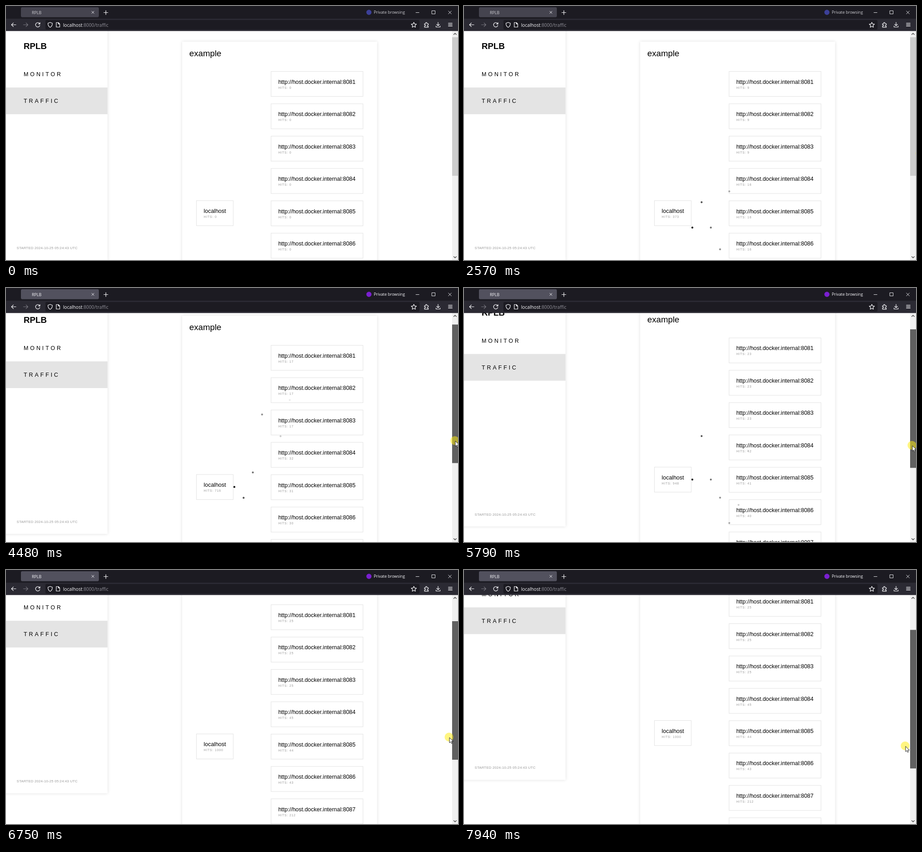
An HTML page for the animation above (8000 ms loop, 998 by 561 pixels).

```html
<!DOCTYPE html>
<html lang="en">
<head>
<meta charset="utf-8">
<title>Traffic monitor</title>
<style>
html, body { margin: 0; width: 100%; height: 100%; overflow: hidden; background: #fff; }
svg { display: block; width: 998px; height: 561px; }
#page { font: 12.47px "Liberation Sans", Arial, sans-serif; }
#page .big { font-size: 18.7px; }
#page .menu { letter-spacing: 3.9px; }
#page .hits { font-size: 7px; letter-spacing: .78px; fill: #999; }
#page .started { font-size: 7.8px; letter-spacing: .2px; fill: #999; }
.panel { fill: #fff; filter: drop-shadow(0 0 3px rgba(0,0,0,.13)); }
.node { fill: #fff; stroke: #e2e2e2; stroke-width: 1; }
#chrome { font: 8.9px "Open Sans", "Noto Sans", sans-serif; }
.icon { fill: none; stroke: #fbfbfe; stroke-width: 1.2; stroke-linecap: round; stroke-linejoin: round; }
.thin { stroke-width: .9; }
</style>
</head>
<body>
<svg viewBox="0 0 998 561">
  <g id="page">
    <rect class="panel" x="-10" y="45" width="234.3" height="516"/>
    <rect y="180" width="224" height="59" fill="#e4e4e4"/>
    <text class="big" x="39" y="95.2" font-weight="bold">RPLB</text>
    <text class="menu" x="39" y="155">MONITOR</text>
    <text class="menu" x="39" y="214.2">TRAFFIC</text>
    <text class="started" x="23.5" y="536.9">STARTED 2024-10-25 05:24:43 UTC</text>
    <rect class="panel" x="389" y="78.8" width="430.5" height="740"/>
    <text class="big" x="404.8" y="110.6">example</text>
    <g id="nodes"></g>
    <g id="dots"></g>
  </g>

  <rect x="985" y="55" width="13" height="506" fill="#f0f0f0"/>
  <rect id="thumb" x="985" width="13" height="306"/>
  <path class="icon" style="stroke:#505050;stroke-width:1.6"
    d="M988.7 63l2.8-2.8 2.8 2.8M988.7 553.5l2.8 2.8 2.8-2.8"/>

  <g id="chrome">
    <rect width="998" height="28" fill="#1c1b22"/>
    <rect y="28" width="998" height="27.3" fill="#2b2a33"/>
    <rect id="tab" x="33" y="2.8" width="172" height="22" rx="3"/>
    <rect x="87" y="31" width="826" height="21" rx="3" fill="#1c1b22"/>
    <g id="title">
      <text x="57" y="17.5">RPLB</text>
      <text x="812" y="17.3">Private browsing</text>
    </g>
    <circle id="badge" cx="801.3" cy="14" r="5.7"/>
    <text x="126" y="45.6" font-size="10.2" fill="#fbfbfe">localhost<tspan fill="#92919a">:8000/traffic</tspan></text>
    <g class="icon">
      <path d="M22 41.5H12.5M16.3 37.3l-4.2 4.2 4.2 4.2"/>
      <path stroke="#77767e" d="M38.5 41.5H48M44.2 37.3l4.2 4.2-4.2 4.2"/>
      <path d="M74.4 39.4a4.8 4.8 0 1 0 .3 3.6M75 36.6v3.2h-3.2"/>
      <path d="M97.5 36.2l4.8 1.8c.2 4.5-1 7.2-4.8 9.2-3.8-2-5-4.7-4.8-9.2z"/>
      <path d="M111 36.5h4.6l3 3v7H111zM115.4 36.7v3h3"/>
      <path d="M900.5 36l1.7 3.7 4 .5-3 2.7.8 4-3.5-2-3.5 2 .8-4-3-2.7 4-.5z"/>
      <path d="M924 39h2.5v-1.2a1.5 1.5 0 0 1 3 0V39h3v3h-1a1.4 1.4 0 0 0 0 2.8h1v2H924v-2.6h1a1.4 1.4 0 0 0 0-2.8h-1z"/>
      <path d="M954 36v7.3M950.8 40.3l3.2 3.2 3.2-3.2M949.5 44v2.5h9V44"/>
      <path d="M976.8 38.2h8.4M976.8 41.3h8.4M976.8 44.4h8.4"/>
      <path class="thin" d="M189.3 11.5l5 5m0-5l-5 5"/>
      <path d="M220.5 10v9M216 14.5h9"/>
      <path class="thin" d="M905 14.5h7M940.5 10.5h7v7h-7zM976.8 11l6.6 6.6m0-6.6l-6.6 6.6"/>
    </g>
  </g>

  <g id="cursor">
    <circle r="9.7" fill="#ffec10" fill-opacity=".52"/>
    <path d="M1 1v11.8l2.7-2.5 1.8 4 2-.9-1.8-3.9h3.7z" fill="#fff" stroke="#111" stroke-width=".9"/>
  </g>
</svg>
<script>
const $ = id => document.getElementById(id);
const set = (id, name, value) => $(id).setAttribute(name, value);

const LOOP = 8000, BEGIN = 500, STEP = 68.2;      // ms
const HOVER = 2650, CLICK = 3100;                 // scrollbar thumb events, ms
const PIXEL = 998 / 1280;                         // size of one screen pixel
const SERVERS = 8, PITCH = 71.45, CENTER = 457.4;
const REQUESTS = 1000, RATE = .1795;              // requests in all, and per ms
const LAST_DOT = Math.floor(REQUESTS / RATE / STEP);

// Pointer: time, x, page scroll.
const drag = [
  [2400, 1014, 0], [2900, 995, 0], [3300, 994, 0], [3460, 992.5, 4],
  [4480, 991, 18], [5790, 989, 34.3], [6750, 978, 67.8], [7940, 974, 97.4]
];

function pointer(t) {
  const next = drag.findIndex(p => p[0] > t);
  if (next < 0) return drag[drag.length - 1];
  if (next === 0) return drag[0];
  const a = drag[next - 1], b = drag[next], u = (t - a[0]) / (b[0] - a[0]);
  return a.map((v, i) => v + (b[i] - v) * u);
}

// Share of the requests that server n receives.
const share = n => n === 0 ? 1 : n < 4 ? .025 : n < 7 ? .049 - n / 1000 : .212;

function random(seed) {
  return Math.abs(Math.sin(seed * 12.9898) * 43758.5) % 1;
}

function node(x, y, width, label) {
  return `<rect class="node" x="${x}" y="${y}" width="${width}" height="55.3"/>
    <text x="${x + 16}" y="${y + 27.2}">${label}</text>
    <text class="hits" x="${x + 16}" y="${y + 38.2}"></text>`;
}

let markup = node(420.5, 429.9, 81.2, "localhost");
for (let n = 1; n <= SERVERS; n++)
  markup += node(585.2, 144.5 + (n - 1) * PITCH, 203, "http://host.docker.internal:808" + n);
$("nodes").innerHTML = markup;
const counters = document.querySelectorAll(".hits");

// One dot leaves per step, moves straight towards a random server and fades.
function dotsAt(step) {
  let out = "";
  for (let k = 0; k < 7; k++) {
    const birth = step - k;
    if (birth < 1 || birth > LAST_DOT || random(birth + .5) < .2) continue;
    const slope = 8 * (Math.floor(random(birth) * 7) - 4);
    out += `<circle cx="${504.2 + 20.4 * k}" cy="${CENTER + slope * (k + 2)}" r="2.1" opacity="${k ? .8 - .12 * k : 1}"/>`;
  }
  return out;
}

function draw(now) {
  const step = Math.floor((now - BEGIN) / STEP);
  const t = step < 0 ? 0 : BEGIN + (step + .5) * STEP;
  const total = Math.min(REQUESTS, Math.max(0, RATE * (t - BEGIN)));
  const [, x, drop] = pointer(t);
  const scroll = Math.round(drop / PIXEL) * PIXEL;
  const active = t > CLICK;

  set("page", "transform", `translate(0 ${-scroll})`);
  counters.forEach((c, n) => c.textContent = "HITS: " + Math.floor(total * share(n) + 1e-6));
  $("dots").innerHTML = dotsAt(step);
  set("thumb", "y", 69 + scroll / 1.54);
  set("thumb", "fill", active ? "#606060" : t > HOVER ? "#a6a6a6" : "#cdcdcd");
  set("tab", "fill", active ? "#52515e" : "#45444f");
  set("title", "fill", active ? "#fbfbfe" : "#cfcfd4");
  set("badge", "fill", active ? "#7a1fd0" : "#3c4099");
  set("cursor", "transform", `translate(${x} ${325.2 + drop / 1.54})`);
}

const start = performance.now();
function frame() {
  draw((performance.now() - start) % LOOP);
  requestAnimationFrame(frame);
}
frame();
</script>
</body>
</html>
```
